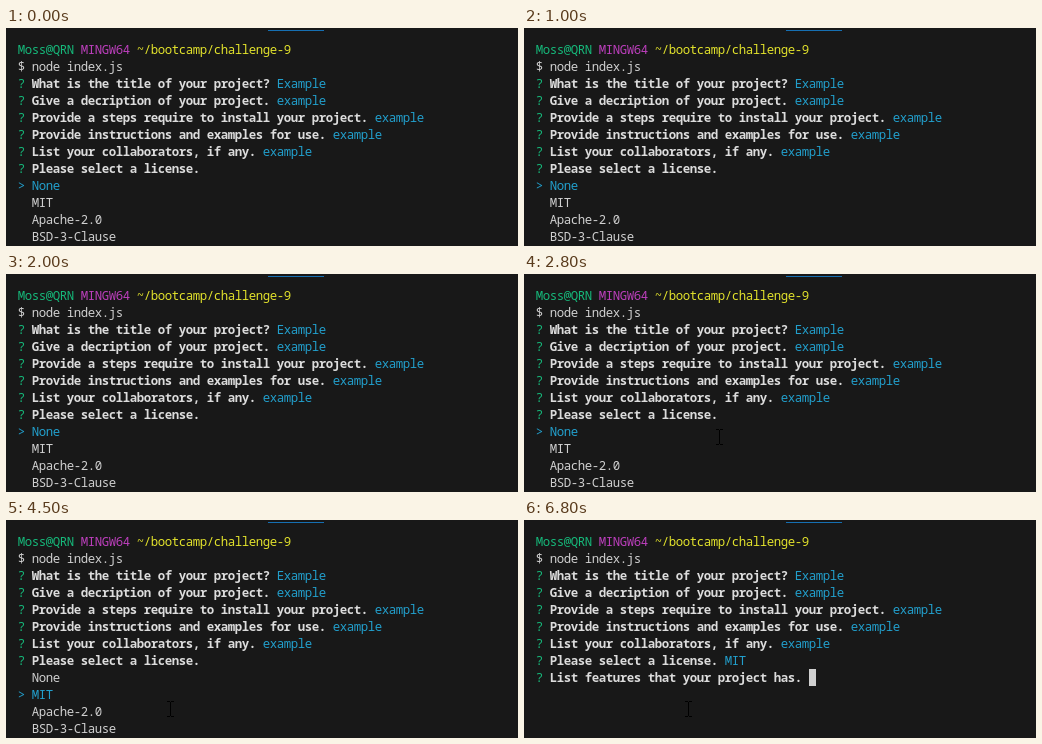
An HTML page with a canvas that plays this animation: 512 px wide and 218 px high, repeating every 7200 ms.

```html
<!DOCTYPE html>
<html lang="en">
<head>
<meta charset="utf-8">
<title>Terminal prompt</title>
<style>
html, body { margin: 0; width: 100%; height: 100%; overflow: hidden; background: #181818; }
canvas { display: block; }
</style>
</head>
<body>
<canvas id="stage" width="512" height="218"></canvas>
<script>
const ctx = document.getElementById('stage').getContext('2d');
const LOOP = 7200, CELL = 7, LINE = 17, LEFT = 12, BASE = 26;
const FONT = '12.4px "Noto Sans Mono", "DejaVu Sans Mono", monospace';
const C = {
  bg: '#181818', text: '#d0d0d0', bold: '#dcdcdc', green: '#16b87a',
  magenta: '#bc3fbc', yellow: '#e2e22c', cyan: '#229fcc', tab: '#166fb2'
};
const questions = [
  ['What is the title of your project?', 'Example'],
  ['Give a decription of your project.', 'example'],
  ['Provide a steps require to install your project.', 'example'],
  ['Provide instructions and examples for use.', 'example'],
  ['List your collaborators, if any.', 'example']
];
const licenses = ['None', 'MIT', 'Apache-2.0', 'BSD-3-Clause'];
const SELECT = 4200, ENTER = 5700;

ctx.textAlign = 'center';

// Writes on the character grid and returns the next free column.
function put(row, col, str, color, weight = 500) {
  ctx.font = weight + ' ' + FONT;
  ctx.fillStyle = color;
  for (const ch of str) {
    if (ch !== ' ') ctx.fillText(ch, LEFT + (col + 0.5) * CELL, BASE + row * LINE);
    col++;
  }
  return col;
}

function ask(row, question, answer = '') {
  put(row, 0, '?', C.green);
  const col = put(row, 2, question, C.bold, 600) + 1;
  put(row, col, answer, C.cyan);
  return col;
}

function menu(row, selected) {
  licenses.forEach((name, i) => {
    const on = i === selected;
    if (on) put(row + i, 0, '>', C.cyan);
    put(row + i, 2, name, on ? C.cyan : C.text);
  });
}

function pointerAt(t) {
  if (t < 2300) return null;
  if (t < 3000) {
    const p = Math.min(1, Math.floor((t - 2300) / 100) / 5);
    const k = 1 - (1 - p) * (1 - p);
    return [Math.round(492 - 297 * k), Math.round(152 + 11 * k * k)];
  }
  return [164, t < 3600 ? 190 : 189];
}

function drawPointer([x, y]) {
  ctx.fillStyle = '#000';
  ctx.fillRect(x, y - 7, 1, 14);
  for (const dy of [-8, 7]) {
    ctx.fillRect(x - 3, y + dy, 3, 1);
    ctx.fillRect(x + 1, y + dy, 3, 1);
  }
}

function draw(t) {
  ctx.fillStyle = C.bg;
  ctx.fillRect(0, 0, 512, 218);
  ctx.fillStyle = C.tab;
  ctx.fillRect(262, 2, 56, 1);

  put(0, 0, 'Moss@QRN', C.green);
  put(0, 9, 'MINGW64', C.magenta);
  put(0, 17, '~/bootcamp/challenge-9', C.yellow);
  put(1, 0, '$ node index.js', C.text);
  questions.forEach(([q, a], i) => ask(2 + i, q, a));

  const done = t >= ENTER;
  ask(7, 'Please select a license.', done ? 'MIT' : '');
  if (done) {
    const col = ask(8, 'List features that your project has.');
    ctx.fillStyle = C.text;
    ctx.fillRect(LEFT + col * CELL, BASE + 8 * LINE - 13, CELL, LINE);
  } else {
    menu(8, t < SELECT ? 0 : 1);
  }

  const pointer = pointerAt(t);
  if (pointer) drawPointer(pointer);
}

const start = performance.now();
function tick(now) {
  draw(Math.max(0, now - start) % LOOP);
  requestAnimationFrame(tick);
}
draw(0);
requestAnimationFrame(tick);
</script>
</body>
</html>
```
